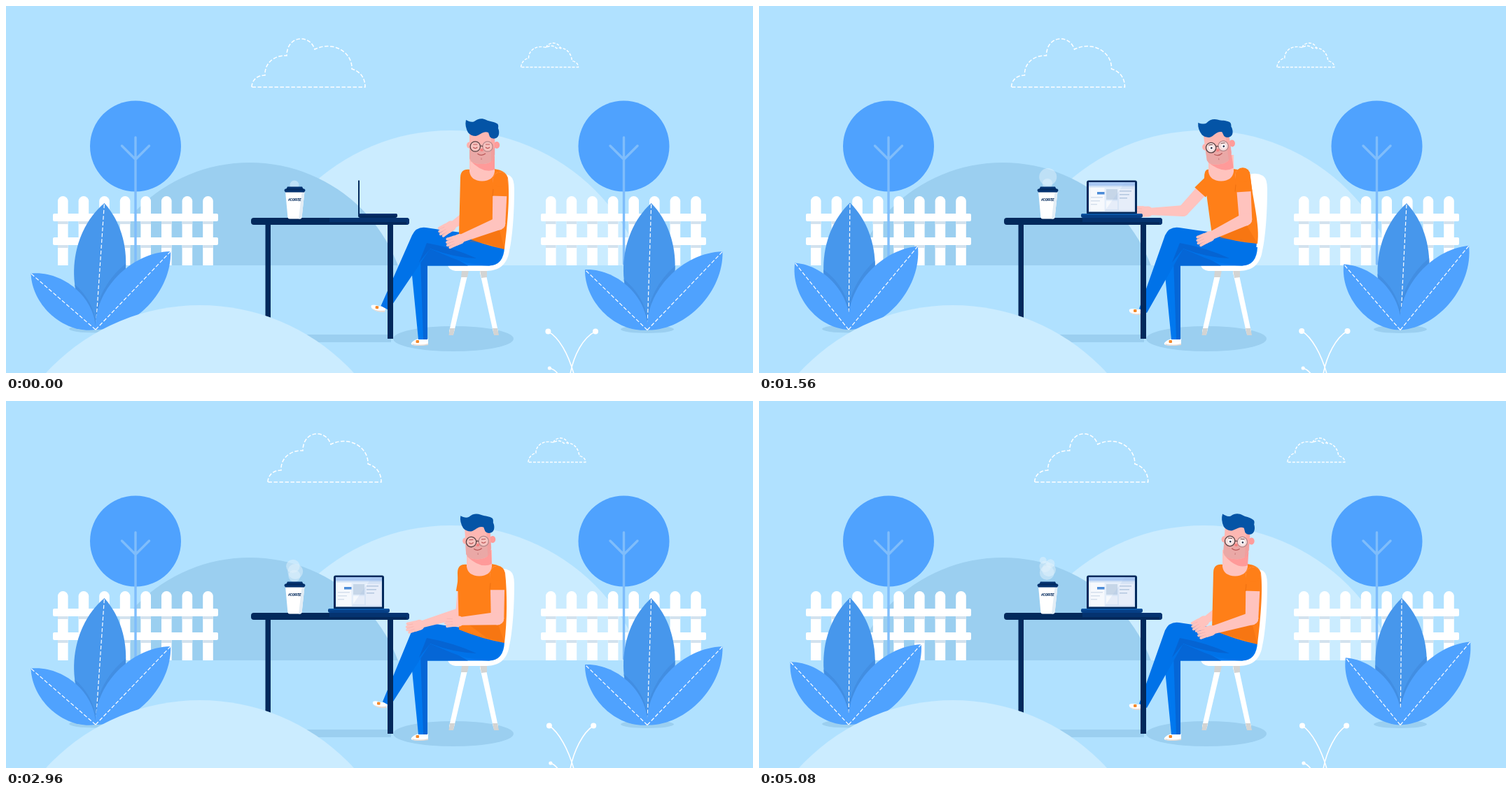
An HTML page with a canvas that plays this animation: 1067x525 px, repeating every 5120 ms.

```html
<!DOCTYPE html>
<html lang="en">
<head>
<meta charset="utf-8">
<title>Garden desk</title>
<style>
html, body { margin: 0; width: 100%; height: 100%; overflow: hidden; background: #b0e1ff; }
canvas { display: block; width: 1067px; height: 525px; }
</style>
</head>
<body>
<canvas id="stage"></canvas>
<script>
const W = 1067, H = 525, LOOP = 5120, STEP = 40;
const canvas = document.getElementById('stage');
const c = canvas.getContext('2d');
const dpr = window.devicePixelRatio || 1;
canvas.width = Math.round(W * dpr);
canvas.height = Math.round(H * dpr);

const SKY = '#b0e1ff', PALE = '#cbecff', SHADE = '#9bcff0', LEAF = '#4fa2fe', LEAF_DARK = '#4797ec';
const NAVY = '#02295c', NAVY2 = '#053370', SKIN = '#ffc3be', SHIRT = '#ff7f18', PANTS = '#0072e8';
const rad = d => d * Math.PI / 180;
const smooth = u => u * u * (3 - 2 * u);

// Monotone cubic through rows of [time, ...values]; returns the values at time t.
function track(rows, t) {
  let i = 0;
  while (i < rows.length - 2 && t >= rows[i + 1][0]) i++;
  const a = rows[i], b = rows[i + 1], h = b[0] - a[0];
  const u = Math.min(1, Math.max(0, (t - a[0]) / h));
  const slope = (k, j) => {
    const p = rows[k - 1], q = rows[k], n = rows[k + 1];
    if (!p || !n) return 0;
    const s1 = (q[j] - p[j]) / (q[0] - p[0]), s2 = (n[j] - q[j]) / (n[0] - q[0]);
    return s1 * s2 <= 0 ? 0 : 2 * s1 * s2 / (s1 + s2);
  };
  return a.slice(1).map((v, k) => {
    const j = k + 1, d = b[j] - v;
    const m0 = slope(i, j) * h, m1 = slope(i + 1, j) * h;
    return v + u * (m0 + u * (3 * d - 2 * m0 - m1 + u * (m0 + m1 - 2 * d)));
  });
}

function shape(d, fill) { c.fillStyle = fill; c.fill(new Path2D(d)); }
function line(d, color, width) {
  c.strokeStyle = color; c.lineWidth = width; c.stroke(new Path2D(d));
}
function disc(x, y, rx, fill, ry = rx) {
  c.fillStyle = fill;
  c.beginPath(); c.ellipse(x, y, rx, ry, 0, 0, 7); c.fill();
}
function box(x, y, w, h, fill, r = 0) {
  c.fillStyle = fill;
  c.beginPath(); c.roundRect(x, y, w, h, r); c.fill();
}
function at(x, y, angle, draw) {
  c.save(); c.translate(x, y); c.rotate(angle); draw(); c.restore();
}

// Tapered limb with round ends; a flat far end when flat is set.
function limb(x1, y1, x2, y2, w1, w2, fill, flat) {
  const a = Math.atan2(y2 - y1, x2 - x1), nx = -Math.sin(a) / 2, ny = Math.cos(a) / 2;
  c.fillStyle = fill;
  c.beginPath();
  c.moveTo(x1 + nx * w1, y1 + ny * w1);
  c.lineTo(x2 + nx * w2, y2 + ny * w2);
  c.lineTo(x2 - nx * w2, y2 - ny * w2);
  c.lineTo(x1 - nx * w1, y1 - ny * w1);
  c.fill();
  disc(x1, y1, w1 / 2, fill);
  if (!flat) disc(x2, y2, w2 / 2, fill);
}

// ---------- scenery ----------
function clouds(t) {
  const [s] = track([[0, 0], [720, 3.5], [1560, 9.5], [2160, 15], [2960, 23], [4360, 37], [5120, 42.8]], t);
  c.setLineDash([5.5, 2.5]);
  at(351 + s, 116, 0, () => line('M0 0C0 -10 8 -17 19 -17C18 -34 32 -46 50 -45C50 -61 60 -69 70 -69C80 -69 87 -63 90 -54C116 -67 144 -50 143 -26C156 -22 162 -12 162 0Z', '#fff', 1.5));
  c.setLineDash([4, 2]);
  at(735.5 + s * .45, 87.5, 0, () => {
    line('M0 0C1 -8 6 -12 11 -13C11 -25 23 -32 36 -28C41 -31 46 -32 51 -27C63 -30 72 -21 73 -9C78 -8 82 -5 82 0Z', '#fff', 1.4);
    line('M36 -28C38 -36 54 -38 57 -26', '#fff', 1.4);
  });
  c.setLineDash([]);
}

function fence(x) {
  for (let i = 0; i < 8; i++) box(x + 7 + i * 29.6, 272, 14.6, 99, '#fff', [7.3, 7.3, 0, 0]);
  for (const y of [297, 331]) {
    for (let i = 0; i < 8; i++) box(x + 7 + i * 29.6, y + 10, 14.6, 5, '#d3e2ee');
    box(x, y, 236, 11, '#fff', 2);
  }
}

function tree(x) {
  c.lineCap = 'round';
  line(`M${x} 188V369M${x - 19.5} 200L${x} 219.5L${x + 19.5} 200`, '#7fbdfb', 3.4);
  c.lineCap = 'butt';
}

// 0 at the time of greatest lean, 1 half a sway later.
function sway(t, peak) {
  const u = (((t - peak) % 2960) + 2960) % 2960 / 1480;
  return smooth(u < 1 ? u : 2 - u);
}

function leafPath(L, w) {
  const k = w / .75;
  return new Path2D(`M0 0C${-k} ${-L * .24} ${-k} ${-L * .74} 0 ${-L}C${k} ${-L * .74} ${k} ${-L * .24} 0 0`);
}

function plant(x, y, t, leaves) {
  disc(x, y - 1, 38, SHADE, 5.5);
  const posed = leaves.map(([L, w, a0, a1, peak]) => ({
    L, path: leafPath(L, w), a: rad(a0 + (a1 - a0) * sway(t, peak))
  }));
  const [mid, ...sides] = posed;
  const midrib = L => {
    c.setLineDash([5.5, 2.8]);
    line(`M0 0V${-L}`, '#fff', 1.2);
    c.setLineDash([]);
  };
  at(x, y, mid.a, () => {
    c.fillStyle = LEAF_DARK;
    c.fill(mid.path);
    c.clip(mid.path);
    c.fillStyle = '#428ee2';
    for (const s of sides) {
      c.save();
      c.rotate(s.a - mid.a - Math.sign(s.a) * .06);
      c.fill(s.path);
      c.restore();
    }
  });
  at(x, y, mid.a, () => midrib(mid.L));
  for (const s of sides) at(x, y, s.a, () => {
    c.fillStyle = LEAF;
    c.fill(s.path);
    midrib(s.L);
  });
}

function backdrop(t) {
  c.fillStyle = SKY;
  c.fillRect(0, 0, W, H);
  clouds(t);
  c.save();
  c.beginPath(); c.rect(0, 0, W, 371); c.clip();
  disc(635, 470, 292, PALE);
  disc(348, 450, 226, SHADE);
  c.restore();
  for (const x of [185, 882.5]) disc(x, 200.5, 65, LEAF);
  fence(67);
  fence(764);
  tree(185);
  tree(882.5);
  plant(128, 463, t, [[181.5, 36.8, 4.6, .2, 360], [122.5, 25.5, -49, -38.7, 0], [155, 30.5, 44, 39.2, -200]]);
  plant(916, 463.5, t, [[181.5, 36.8, 4.7, .3, 900], [124, 25.5, -48.4, -38.8, 500], [155.5, 30.5, 44, 39, 200]]);
  box(400, 470, 150, 11, SHADE);
}

function sprout(t) {
  const q = Math.cos(2 * Math.PI * t / 2080);
  const l = 775.2 - q * .8, r = 840.5 + q * 1.5, y = 465 + q * .6;
  line(`M${l} ${y}C790 474 803 498 811 526M${r} ${y}C824 474 811 500 806 526M${l + 2} 518Q784 520 789 527`, '#fff', 1.6);
  disc(l, y, 4, '#fff');
  disc(r, y, 4, '#fff');
  disc(l + 2, 518, 2.6, '#fff');
}

// ---------- table ----------
function steam(t) {
  [0, 1300, 2200, 3000, 3700].forEach((born, i) => {
    const a = (t - born) / 1000;
    if (a < 0) return;
    const big = i ? 11 : 12.7;
    const r = a < 1.6 ? 6.5 + (big - 6.5) * a / 1.6 : Math.max(4.5, big - (a - 1.6) * 2.2);
    const x = 412 + [-.7, .9, -1, 1, -.8][i] * Math.max(0, a - .8) * 1.6 + (i ? 0 : Math.sin(a) * 1.6);
    disc(x, 256 - 8.2 * a + .53 * a * a, r, 'rgba(225,241,252,.5)');
  });
}

function cup() {
  shape('M399 265H426.5L422.6 302Q422.4 304.5 420 304.5H405Q402.6 304.5 402.4 302Z', '#fff');
  shape('M422.5 266H426.5L422.6 302Q422.4 304.5 420 304.5H418Z', '#e3edf5');
  shape('M402 258.5H423L424.5 261.5H426Q427.5 262 427.5 264L426 266.5H399L397.5 264Q397.5 262 399 261.5H400.5Z', NAVY2);
  shape('M400.5 261.5H424.5L425 263H400Z', NAVY);
  c.fillStyle = NAVY;
  c.font = 'italic 900 4.5px Roboto, Arial, sans-serif';
  c.textAlign = 'center';
  c.fillText('#COFFEE', 412.3, 279);
}

function laptop(t) {
  const p = smooth(Math.min(1, Math.max(0, (t - 800) / 440)));
  const mix = (a, b) => a + (b - a) * p;
  const left = mix(503, 468), right = mix(505, 540);
  c.save();
  c.translate(left, 0);
  c.scale((right - left) / 72, 1);
  box(0, 249.5, 72, 49, NAVY, 3);
  if (p > .05) {
    box(3, 252, 66, 42.5, '#e4eefa');
    box(3, 252, 66, 5, '#a9c8f3');
    box(3, 257, 66, 2, '#cfe0f6');
    box(4.5, 260, 21, 33, '#f6f9fd');
    box(28, 262, 16, 15, '#c6d6e8');
    box(46, 262, 21, 30, '#f6f9fd');
    box(15, 266, 10.5, 3.5, '#4a8bd8');
    for (let i = 0; i < 3; i++) {
      box(47, 264 + i * 5, 17 - i * 3, 1.5, '#b8c9de');
      box(6, 273 + i * 5, 17 - i * 4, 1.5, '#d4dfec');
    }
    box(28, 279, 16, 12, '#f6f9fd');
    shape('M69 252V294.5H25L55 252Z', 'rgba(155,185,225,.18)');
  }
  c.restore();
  const a = mix(503, 460), b = mix(559, 548);
  box(a, 297, b - a, 6, p > .5 ? '#063f86' : NAVY, [2, 2, 3, 3]);
  box(a + 1, 297, b - a - 2, 2, p > .5 ? '#0a55a4' : NAVY2, 1);
}

function table(t) {
  box(370.5, 312, 7.5, 140, NAVY);
  box(545, 312, 8, 164, NAVY);
  box(350, 303, 226, 10, NAVY, 4);
  box(462, 303, 114, 10, NAVY2, [0, 4, 4, 0]);
  box(462, 309, 110, 4, NAVY);
  steam(t);
  cup();
  laptop(t);
}

// ---------- person ----------
function chair() {
  disc(639, 476, 86, SHADE, 18);
  limb(656, 381, 636.5, 466, 8, 7, '#fff');
  limb(681, 381, 699.5, 466, 8, 7, '#fff');
  shape('M651 378H661L659 388L650 388ZM677 378H687L687 388L679 389ZM634 461H641L639 471H632.5ZM695 461H702L704 471H697Z', '#d3d4d3');
  shape('M694 244Q708 236 720 243Q726 247 726 262C726 300 723 335 718 355C713 374 700 379 684 379H642Q631 377 631 369H690Z', '#fff');
}

function legs(t) {
  const [f] = track([[0, 1], [420, 0], [2650, 0], [3150, 1], [3650, 0], [4150, 1], [4600, 0], [5120, 0]], t);
  const dx = -7.5 * f, dy = -4 * f;
  at(545 + dx, 437 + dy, rad(7 * f), () => {
    shape('M-16 -3Q-12 -5 -4 -3L5 -3L4 4Q-8 6 -14 2Q-17 0 -16 -3Z', '#fff');
    shape('M-15 1Q-8 5 4 2L4 4.5Q-8 6.5 -14 2Z', '#e6dad3');
    box(-10, -3, 4.5, 4, '#f58a2c', 1);
  });
  shape('M579 482Q583 477 590 476H603V484Q590 487 581 485Q578 484 579 482Z', '#fff');
  shape('M580 483Q592 486 603 483V485Q590 487 581 485Z', '#e6dad3');
  box(585.5, 478, 4.5, 4, '#f58a2c', 1);
  shape('M712 345Q711 371 690 371.5H602V477H589L579 375Q578 350 600 338Z', '#0078ef');
  shape('M600 345L592 362L596 477H602V371.5H660L640 360Z', '#0566d6');
  const ax = 546 + dx, ay = 433 + dy;
  shape(`M711 334L650 324Q625 321 600 317Q586 315 580 328L${ax - 3} ${ay}L${ax + 8} ${ay + 6}L606 347C640 362 660 371 690 371.5Q711 370 711 334Z`, PANTS);
  shape('M601 339Q640 346 672 361Q640 360 606 347L590 367Z', '#0564d3');
}

function hand(x, y, angle, thumb) {
  at(x, y, angle, () => {
    if (thumb > .5) {
      box(-2, -9, 20, 18, SKIN, 6);
      limb(3, 3, 5, 3 + 10 * thumb, 8, 6, SKIN);
      line('M10 -4H18M10 0H18M10 4H17', '#f7a9a6', .9);
    } else {
      box(-5, -7.5, 18, 15, SKIN, 6);
      for (let i = 0; i < 4; i++) limb(8, -5 + i * 3.5, 21 - Math.abs(i - 1.3) * 2, -6 + i * 4.2, 4.6, 3.6, SKIN);
      line('M10 -3.6L19 -4M10 .2L20 .5M10 4L18 5', '#f7b2ae', .7);
    }
  });
}

function arm(sx, sy, ex, ey, wx, wy, thumb, w, sleeve) {
  const a = Math.atan2(ey - sy, ex - sx);
  limb(sx, sy, ex, ey, w, w * .88, SKIN);
  limb(ex, ey, wx, wy, w * .88, w * .55, SKIN);
  hand(wx, wy, Math.atan2(wy - ey, wx - ex), thumb);
  limb(sx, sy, sx + Math.cos(a) * sleeve, sy + Math.sin(a) * sleeve, w, w + 3, SHIRT, true);
}

function head(x, tilt, blink) {
  at(x, 235, 0, () => shape('M-18 -22H18V2Q16 15 0 15.5Q-16 15 -18 2Z', SKIN));
  at(x, 235, rad(tilt), () => {
    shape('M-17 -14L18 -20V-1Q2 6 -17 -14Z', '#ff9a99');
    disc(-18, -36, 4, '#ffb1ad', 4.6);
    disc(21, -36, 4.2, '#ff9c9a', 5);
    shape('M-18 -58H18V-24Q17 -10 2 -9Q-15 -8 -18 -17Z', '#fdb7b2');
    shape('M-18 -33Q-10 -27 0 -29Q10 -27 18 -33V-24Q17 -10 2 -9Q-15 -8 -18 -17Z', '#eaa8a6');
    shape('M13 -56H18.5V-23Q17 -15 13 -12Z', 'rgba(255,140,140,.35)');
    for (const [ex, rim] of [[-9.7, '#554143'], [8, '#b5888a']]) {
      disc(ex, -34, 6.8, blink ? '#f6c3bf' : '#f6dedd');
      if (blink) {
        line(`M${ex - 3} -33Q${ex} -30 ${ex + 3} -33M${ex - 3} -37H${ex + 3}`, '#bd5858', 1.2);
      } else {
        disc(ex + .4, -33.6, 3, '#fff');
        disc(ex + .6, -33.4, 1.4, '#33354d');
        line(`M${ex - 3} -38.2H${ex + 3}`, '#735050', 1);
      }
      c.strokeStyle = rim;
      c.lineWidth = 1.3;
      c.beginPath(); c.arc(ex, -34, 7.2, 0, 7); c.stroke();
    }
    line('M-2.5 -34Q-1 -36 .8 -34', '#554143', 1.2);
    disc(-.5, -29, 2.4, '#f5807f', 2);
    line('M-6.5 -23.8Q-1 -19.5 5 -24', '#b95859', 1.2);
    line('M-1 -17.5V-15', '#c97c7c', 1.1);
    shape('M-23 -72C-19 -70 -15 -68 -11 -70C-6 -74 0 -75 6 -72C10 -70 16 -70 21 -67Q24 -66 23 -60C25 -56 25 -48 20 -46Q14 -44 11 -48L9 -54C2 -57 -3 -50 -9 -49Q-16 -49 -20 -54Q-25 -63 -23 -72Z', '#0454a6');
  });
}

// time, neck x, tilt, left shoulder, right shoulder, hem y,
// near elbow, near wrist, near thumb, far elbow, far wrist, far thumb
const rest = [680, 4, 649, 717, 348, 704, 311, 647, 328, 0, 659, 300, 637, 314, 0];
const wait = [680, 0, 649, 717, 348, 704, 311, 649, 333, 0, 659, 300, 637, 314, 0];
const reach = [653, -8, 632, 698, 335, 693, 304, 647, 332, 0, 583, 279, 526, 280, 1];
const turned = [660, -8, 636, 702, 340, 695, 305, 645, 329, 0, 606, 293, 557, 294, 0];
const praise = [664, -4, 638, 704, 341, 697, 308, 644, 305, 1, 610, 292, 557, 294, 0];
const back = [676, -3, 645, 713, 346, 702, 311, 648, 315, 0, 650, 303, 592, 320, 0];
const poses = [
  [0, ...wait], [120, ...wait], [680, ...reach], [800, ...reach], [1260, ...turned], [1640, ...turned],
  [2080, ...praise], [2560, ...praise], [2960, ...back], [3360, ...rest], [5120, ...rest]
];

function person(t) {
  const [n, tilt, ls, rs, hem, nex, ney, nwx, nwy, nt, fex, fey, fwx, fwy, ft] = track(poses, t);
  const sy = 248 - (717 - rs) * .42;
  chair();
  legs(t);
  arm(ls + 11, 248, fex, fey, fwx, fwy, ft, 18, 25);
  shape(`M${n - 17} 234Q${ls} 232 ${ls} 246L647 327Q680 ${(327 + hem) / 2 + 4} 712 ${hem}C716 315 ${rs + 3} 275 ${rs} 246Q${rs - 3} 235 ${n + 17} 233Z`, SHIRT);
  shape(`M${nwx + 12} ${nwy + 4}L${nex} ${ney + 6}L712 ${hem}L686 ${(327 + hem) / 2 + 2}Z`, 'rgba(225,95,5,.28)');
  head(n, tilt, t < 120 || (t >= 2880 && t < 3040));
  arm(rs - 11, sy, nex, ney, nwx, nwy, nt, 21, 24);
  line(`M${rs - 22} ${sy + 24}L${rs - 21} ${sy + 14}`, '#ee7010', 1);
}

function draw(t) {
  c.setTransform(dpr, 0, 0, dpr, 0, 0);
  backdrop(t);
  person(t);
  table(t);
  disc(277, 726, 298, PALE);
  sprout(t);
}

const start = performance.now();
function frame() {
  const t = (performance.now() - start) % LOOP;
  draw(Math.floor(t / STEP) * STEP);
  requestAnimationFrame(frame);
}
frame();
</script>
</body>
</html>
```
